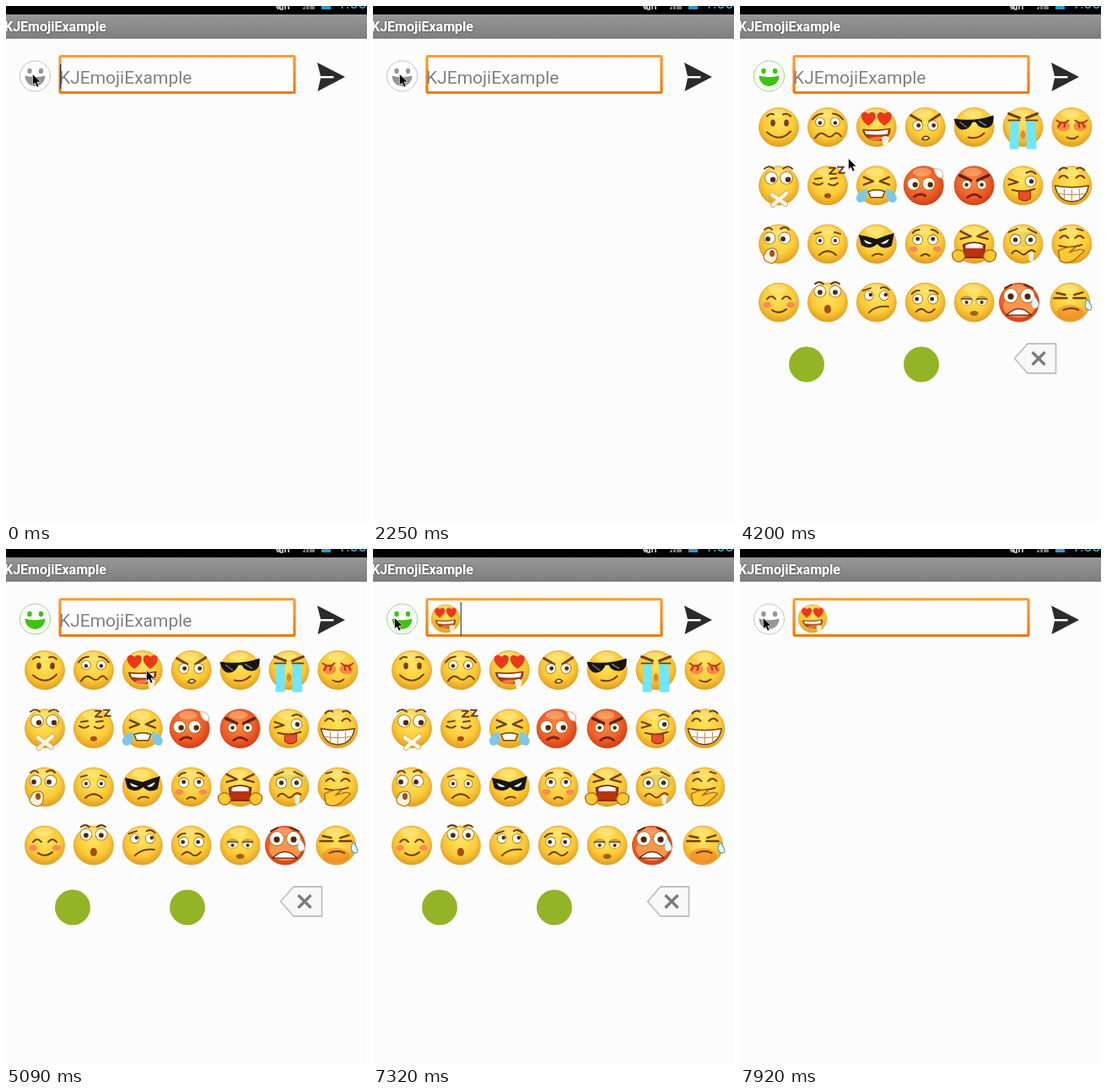
These frames come from a looping animation (428 by 610 pixels, 8 s). An HTML page:

```html
<!DOCTYPE html>
<html lang="en">
<head>
<meta charset="utf-8">
<title>KJEmojiExample</title>
<style>
  html, body { margin: 0; width: 100%; height: 100%; overflow: hidden; background: #fcfcfc; }
  svg { display: block; width: 428px; height: 610px; font-family: Roboto, sans-serif; }
</style>
</head>
<body>
<svg viewBox="0 0 428 610">
  <defs>
    <radialGradient id="yellow" cx=".5" cy=".38" r=".64">
      <stop offset="0" stop-color="#ffe45e"/><stop offset=".6" stop-color="#fbcb38"/><stop offset="1" stop-color="#e09a1c"/>
    </radialGradient>
    <radialGradient id="red" cx=".45" cy=".4" r=".64">
      <stop offset="0" stop-color="#fb8a3c"/><stop offset=".6" stop-color="#f0602a"/><stop offset="1" stop-color="#cf3a12"/>
    </radialGradient>
    <linearGradient id="bar" x2="0" y2="1">
      <stop offset="0" stop-color="#979797"/><stop offset="1" stop-color="#7e7e7e"/>
    </linearGradient>
    <linearGradient id="frame" x2="0" y2="1">
      <stop offset="0" stop-color="#fa9d35"/><stop offset="1" stop-color="#f27a08"/>
    </linearGradient>
    <filter id="shade" x="-10%" y="-30%" width="120%" height="160%">
      <feDropShadow dx="0" dy="0" stdDeviation="1.2" flood-opacity=".6"/>
    </filter>
  </defs>

  <rect width="428" height="610" fill="#fcfcfc"/>
  <rect width="428" height="10" fill="#000"/>
  <path d="M320 1h5v2h-4M328 0v4h-3M331 0v4M335 0v4" fill="none" stroke="#ddd" stroke-width="1.6"/>
  <path d="M352 4V2l3-2v4zM356 4V0h3v4zM360 4V0h6v4z" fill="#777"/>
  <rect x="374" width="11" height="4" fill="#2a9bc8"/>
  <text x="393" y="3" font-size="18" fill="#33b5e5">1:00</text>
  <rect y="10" width="428" height="28" fill="url(#bar)"/>
  <rect y="37.5" width="428" height="1.2" fill="#747474"/>
  <text x="-2" y="30" font-size="16" font-weight="700" fill="#fff" filter="url(#shade)">KJEmojiExample</text>

  <g id="smiley">
    <circle cx="34.5" cy="83" r="18" fill="#fefefe" stroke="currentColor" stroke-opacity=".55"/>
    <g fill="currentColor">
      <ellipse cx="28" cy="77" rx="2.7" ry="3.3"/><ellipse cx="41.5" cy="77" rx="2.7" ry="3.3"/>
      <path d="M22.5 82.5Q34.5 86 46.5 82.5C46 99 23 99 22.5 82.5Z"/>
    </g>
  </g>
  <rect x="64" y="59.5" width="278" height="43" rx="1.5" fill="#fdfdfd" stroke="url(#frame)" stroke-width="3.2"/>
  <text id="hint" x="63" y="92" font-size="21" fill="#808080">KJEmojiExample</text>
  <path d="M369 67L402 84 369.5 101 373 85.500H388.500V83H373Z" fill="#2b2b2b"/>

  <g id="panel">
    <g id="faces"></g>
    <circle cx="79" cy="424.500" r="21" fill="#93b427"/>
    <circle cx="215" cy="424.500" r="21" fill="#93b427"/>
    <path d="M325.500 417.500L341 400H374.500V435H341Z" fill="#f8f8f8" stroke="#c0c0c0" stroke-width="1.8" stroke-linejoin="round"/>
    <path d="M346.500 410l15 15m0-15l-15 15" stroke="#7c7c7c" stroke-width="3.400"/>
    <rect id="scroll" x="411.500" y="111.500" width="5" height="73" rx="2.5" fill="#999" stroke="#666"/>
  </g>
  <g id="typed" transform="translate(86 82.500) scale(.72)"></g>
  <rect id="hintCaret" x="64" y="69" width="1.3" height="29" fill="#333"/>
  <rect id="endCaret" x="103.700" y="63" width="1.2" height="40" fill="#444"/>
  <path id="mouse" d="M.5 .5V13.500L3.500 11 5.700 16 8 15 5.800 10H10Z" fill="#000" stroke="#fff" stroke-width=".6"/>
</svg>
<script>
const $ = id => document.getElementById(id);
const INK = '#70400c', SKY = '#7cc8ea';

// Face parts are drawn around the face centre.
const path = (d, w = 2, stroke = INK, fill = 'none') =>
  `<path d="${d}" fill="${fill}" stroke="${stroke}" stroke-width="${w}" stroke-linecap="round" stroke-linejoin="round"/>`;
const fill = (d, color) => path(d, 0, 'none', color);
const dot = (x, y, rx, color = '#50290a', ry = rx) =>
  `<ellipse cx="${x}" cy="${y}" rx="${rx}" ry="${ry}" fill="${color}"/>`;
const eye = (x, y, r = 5, dx = 0, dy = 0) =>
  dot(x, y, r + .8, '#a4690f') + dot(x, y, r, '#fff') + dot(x + dx, y + dy, r * .45);
const eyes = (y, gap = 8, r = 5, dx = 0, dy = 0, mid = 0) =>
  eye(mid - gap, y, r, dx, dy) + eye(mid + gap, y, r, dx, dy);
const blush = (y, gap = 14) => dot(-gap, y, 5, '#f98a55', 3.5) + dot(gap, y, 5, '#f98a55', 3.5);
const arcs = (y, gap = 9) => [-gap, gap].map(x => path(`M${x - 5} ${y}q5 -6 10 0`)).join('');
const heart = x => `<path transform="translate(${x} -10) scale(1.4)" d="M0 6C-10 0-6-9 0-4 6-9 10 0 0 6Z" fill="#e9381a"/>`;
const head = (color = 'yellow') =>
  `<ellipse rx="23.500" ry="23" fill="url(#${color})" stroke="${color === 'red' ? '#c4481c' : '#dba23c'}" stroke-width=".8"/>`
  + dot(-2, -16, 11, 'rgba(255,255,210,.3)', 5);
const yellow = (...parts) => head() + parts.join('');
const red = (...parts) => head('red') + parts.join('');
const shift = (x, face) => `<g transform="translate(${x})">${face}</g>`;

const loving = yellow(heart(-9.5), heart(9.5),
  path('M-16 3Q0 5 16 2C16 20-13 20-16 3Z', 1.5, '#8a3208', '#a8400f'),
  fill('M-14 4Q0 6 14 3L13 8Q0 10-13 8Z', '#fff'),
  fill('M-9 13Q0 10 9 12Q2 18-6 16Z', '#f2793a'),
  fill('M6 12Q11 9 15 12L13 22Q10 25 8 21Z', '#fff3dc'));

const rows = [
  [
    yellow(path('M-14-13q4-4 8-2M5-15q5-2 9 2M-14 6Q1 19 14 5'), dot(-7, -5, 2.8, INK, 4), dot(9, -5, 2.8, INK, 4)),
    yellow(path('M-18-9Q-13-16-6-16M6-16Q13-16 18-9'), eyes(-6, 9, 5, 0, 1), path('M-15 13Q-9 4-3 9T7 9 16 11')),
    loving,
    yellow(path('M-17-14L-5-7M5-7L17-15', 3), eyes(-2, 9, 5.500, 1), path('M-4 14Q0 8 5 13Q1 17-4 14Z', 1.5, INK, '#f5e3b8')),
    yellow(fill('M-24-10Q0-6 23-14Q24 0 14 1 5 1 2-6L-2-6Q-6 4-15 3-22 1-24-10Z', '#171411'),
      path('M-17-6l8 6M6-7l8 5', 1.5, '#777'), path('M-7 12Q4 15 12 7')),
    yellow(path('M-17-16l13 5M4-11l13-5', 3), path('M-17-8h13M4-8h13'),
      fill('M-15-7h10V26h-11ZM4-7h11L16 26H4Z', '#70e6f6'), dot(0, 9, 3, '#e28a2c', 5)),
    yellow(dot(-10, -1, 8, '#f58a48', 6), dot(10, -1, 8, '#f58a48', 6),
      path('M-18-8Q-10-2-4-8M4-8Q11-2 18-8M-14-4l-2 4M-8-4l-1 4M8-4l1 4M13-4l2 4', 2, '#b8371a'), path('M-6 12Q1 16 7 11'))
  ],
  [
    yellow(path('M-17-20q6-5 11 0M5-20q6-5 11 0'), eyes(-9, 9, 7, 2, 2),
      path('M-8 11L8 22M9 9L-7 23', 6, '#c9a05c'), path('M-8 11L8 22M9 9L-7 23', 4.5, '#fff5dc')),
    yellow(path('M-17-3q6 4 11 0M1-2q6 4 11-1M-15-8l8-1M3-8l8-1'), dot(0, 12, 4, '#a84b10', 3),
      path('M2-21h7l-7 7h8M12-22h7l-6 7h7', 2)),
    yellow(path('M-15-10l11 5-11 4M15-10L4-5l11 4', 2.5), path('M-10 7Q0 3 10 7L7 14H-7Z', 1.5, INK, '#fff'),
      fill('M-12 3Q-30 12-21 20-9 21-12 3ZM12 3Q30 12 21 20 9 21 12 3Z', SKY)),
    shift(-2, red(eyes(-2, 9, 7, 2, 1, -3), path('M-11 13Q-4 8 2 12', 3, '#7c240a'),
      path('M12-20Q24-21 23-9 15-7 12-20Z', 1, '#d8a488', '#fff'))),
    red(path('M-17-12L-4-6M4-6L17-12', 3.5, '#64200b'), eyes(-1, 9, 5), path('M-8 14Q0 7 8 14', 2.5, '#64200b')),
    yellow(path('M-17-8l11 4-11 3M4-15q6-4 11 1'), eye(9, -5, 6, 1), path('M-13 5Q0 9 14 4'),
      path('M-5 7H9V15Q2 21-5 15Z', 1.2, '#a8321c', '#e94e2c')),
    yellow(arcs(-9, 10), path('M-15-18q4-5 9-2M6-20q5-3 9 2'),
      path('M-20 0Q0 4 20 0 16 19 0 19-16 19-20 0Z', 1.5, INK, '#fff'), path('M-18 9Q0 13 18 9M-9 4v13M0 5v13M9 4v13', 1, '#bc8845'))
  ],
  [
    yellow(path('M-17-17q5-5 9 0M2-18q6-4 10 1'), eyes(-7, 9, 6.500, -2, 1, -2),
      path('M-14 7Q-5 2-2 9 0 20-8 23-19 21-18 14Z', 1.3, '#b67b2b', '#fff3db'), dot(-8, 11, 3, '#a84b10', 4)),
    yellow(path('M-15-12l7-2M8-14l7 2'), eyes(-4, 9, 4.500), path('M-10 13Q0 4 10 13')),
    yellow(fill('M-21-11Q-9-9 0-6 10-10 21-13L18 2Q8 8 1 0-9 8-18 1Z', '#171411'),
      fill('M-15-5l10 4q-7 3-10-4M15-6L5-1q7 3 10-5', '#fff'), path('M-5 14Q1 10 7 13')),
    yellow(path('M-15-13q3-4 8-4M7-17q5 0 8 4'), eyes(-5, 9, 5.500, 0, -1), blush(6), path('M-5 14Q0 10 5 14')),
    yellow(path('M-16-15l12 6-12 3M16-15L4-9l12 3', 2.5), path('M-13 1Q0-5 13 1L11 16H-11Z', 1.5, '#702008', '#bc3211'),
      fill('M-10 1Q0-3 10 1V5H-10Z', '#fff'), path('M-23 8q8-3 11 3t-4 10q-10 1-10-10ZM23 8q-8-3-11 3t4 10q10 1 10-10Z', 1.3, '#a76612', '#ffc832')),
    yellow(dot(2, -6, 18, 'rgba(190,196,90,.4)', 9), path('M-17-14l10-4M6-18l10 5'), eyes(-5, 9, 6),
      path('M-13 11q4-6 9-1t9 0 9-1'), fill('M7 10h6L12 20Q9 23 7 18Z', '#d8f2eb')),
    yellow(arcs(-7, 9), path('M-14-16l7-2M6-18l7 2M-15 2Q-3 6 12 1'),
      path('M-16 8Q-3 2 4 4L-3 10Q12 4 15 8L3 19Q-6 25-14 20Z', 1.4, '#ad6914', '#ffc936'))
  ],
  [
    yellow(arcs(-4), blush(3), path('M-8 9Q0 15 9 8')),
    yellow(path('M-15-22q5-4 10 0M4-22q5-4 10 0'), eyes(-13, 9, 6.500, 0, 1), dot(0, 8, 4, '#a84b10', 5)),
    yellow(path('M-16-14l9-3M5-17q5-3 10 2'), eyes(-8, 9, 5, 2, -1), path('M-9 12Q0 3 14 5')),
    yellow(path('M-16-10q4-5 9-4M5-14q6-1 10 4'), eyes(-4, 9, 5.500, -1), path('M-11 11q6-6 11-1t11-2')),
    yellow(dot(-9, -2, 7.5, '#c4a544', 6), dot(9, -2, 7.5, '#c4a544', 6), dot(-9, -1, 6, '#f6eed0', 4), dot(9, -1, 6, '#f6eed0', 4),
      path('M-15-4h12M3-4h12', 1.5), dot(-9, 0, 2), dot(9, 0, 2), dot(0, 13, 5, '#a86012', 3)),
    shift(-4.5, red(dot(0, 4, 19, '#f9964c', 14), path('M-17-17l8-4M6-21l10 4', 2, '#60210a'), eyes(-8, 10, 8, 0, 1),
      path('M-15 15Q0 0 14 15Z', 1.4, '#641b08', '#fff'), path('M18-7Q28 6 18 7 12 4 18-7Z', 1, '#b8dce8', '#e8faff'))),
    shift(-2, yellow(dot(0, 12, 16, 'rgba(244,124,40,.55)', 9), path('M-19-5H-4M4-5H18M-16-11l10 2M5-9l10-3', 2.5), path('M-8 9Q2 5 10 9'),
      path('M20-4Q30 9 22 9 15 7 20-4Z', 1.2, '#719eb0', '#e4f7fc')))
  ]
];

$('faces').innerHTML = rows.map((row, r) => row.map((face, c) =>
  `<g transform="translate(${46 + c * 57.9} ${143.5 + r * 69.2})">${face}</g>`).join('')).join('');
$('typed').innerHTML = loving;

const LOOP = 8000;
// Holds each value until the next listed time.
function hold(id, property, steps) {
  const frames = [...steps, [LOOP, steps.at(-1)[1]]]
    .map(([time, value]) => ({ offset: time / LOOP, [property]: value, easing: 'steps(1, end)' }));
  $(id).animate(frames, { duration: LOOP, iterations: Infinity });
}
const toggle = (id, first, times) =>
  hold(id, 'opacity', [0, ...times].map((time, i) => [time, i % 2 ? 1 - first : first]));
const move = points => hold('mouse', 'transform', points.map(([t, x, y]) => [t, `translate(${x}px, ${y}px)`]));

toggle('panel', 0, [3450, 7470]);
toggle('hint', 1, [5230]);
toggle('typed', 0, [5230]);
toggle('hintCaret', 1, [300, 750, 1350, 1800, 2250, 3750, 4190, 4640, 5090]);
toggle('endCaret', 0, [5230, 5830, 6280, 6720, 7320, 7770]);
hold('scroll', 'opacity', [[0, 1], [3900, .5], [4050, 0]]);
hold('smiley', 'color', [[0, '#969696'], [3450, '#3cc414'], [7470, '#969696']]);
move([
  [0, 31, 80], [3900, 48, 101], [4050, 87, 146], [4190, 128, 180], [4340, 154, 188], [4490, 165, 162], [4640, 166, 143],
  [5830, 158, 140], [5980, 121, 126], [6280, 104, 119], [6430, 74, 103], [6570, 40, 87], [6720, 25, 81], [7920, 27, 81]
]);
</script>
</body>
</html>
```
